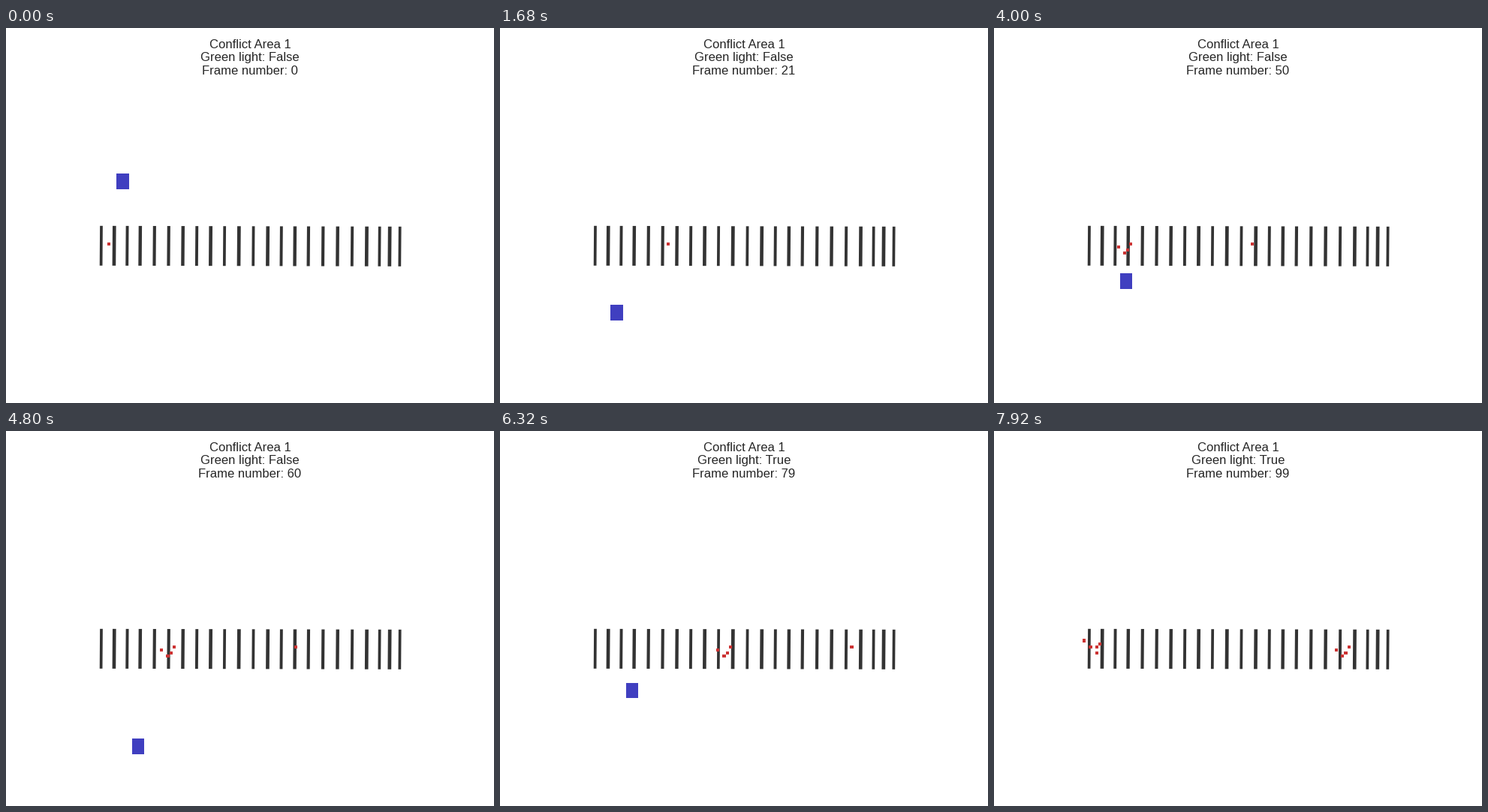
A matplotlib script that plays this animation: 650 px wide and 500 px high, repeating every 8000 ms.

```python
import matplotlib.pyplot as plt
import numpy as np
from matplotlib.animation import FuncAnimation
from matplotlib.patches import Polygon, Rectangle

WIDTH, HEIGHT, DPI = 650, 500, 100
FRAMES, INTERVAL = 100, 80
COL, ROW = 4.147, 4.152            # grid pitch in pixels
LEFT, TOP = 134.68, 285.8          # corner of grid cell (0, 0)
GREEN_FROM = 78
LAST_COL = 94
CAR_START_ROW, CAR_STEPS = -22, 32
CAR_COLS = {0: 3, 34: 8, 62: 8}    # arrival -> lane column

plt.rcParams["font.family"] = "Liberation Sans"
fig = plt.figure(figsize=(WIDTH / DPI, HEIGHT / DPI), dpi=DPI, facecolor="white")
ax = fig.add_axes([0, 0, 1, 1])
ax.set(xlim=(0, WIDTH), ylim=(HEIGHT, 0))
ax.axis("off")


def draw_crossing():
    """Stripes are nearly even, closing up at the right, with uneven widths."""
    index = np.arange(23)
    centers = np.interp(index, [0, 3, 6, 9, 12, 15, 19, 20, 22],
                        [126.8, 178.7, 235.6, 291, 348.6, 402.8, 480.4, 497.5, 524.5])
    half_widths = 2.1 + 0.25 * np.cos(2 * np.pi * (index - 10) / 2.2)
    for x, half in zip(centers, half_widths):
        top = 263.8 + (x - 127) / 400
        bottom = top + 53
        ax.add_patch(Polygon([(x - half + 0.2, top), (x + half + 0.2, top),
                              (x + half - 0.2, bottom), (x - half - 0.2, bottom)],
                             facecolor="#333333", linewidth=0))


def add_box(cols, rows, color, zorder):
    return ax.add_patch(Rectangle((0, 0), cols * COL, rows * ROW, facecolor=color,
                                  linewidth=0, zorder=zorder))


def place(box, col, row, visible):
    box.set_xy((LEFT + col * COL, TOP + row * ROW))
    box.set_visible(visible)


def pack(arrival, size, col, row):
    """Walkers side by side, each further above the one before."""
    return [(arrival, col + k, row - k * (k + 1) // 2) for k in range(size)]


def columns_walked(frame):
    """Walkers go at double pace once the light is green."""
    return frame + max(0, frame - GREEN_FROM)


walkers = (pack(0, 1, 0, 0)
           + pack(40, 3, -1, 3) + pack(40, 1, -3, 1)
           + pack(80, 2, 0, 0) + pack(80, 1, -2, 0)
           + pack(90, 1, 0, 2) + pack(90, 1, -4, -2))

draw_crossing()
walker_boxes = [add_box(1, 1, "#cc3333", 3) for _ in walkers]
car_boxes = [add_box(4, 5, "#403fc0", 4) for _ in CAR_COLS]
title = ax.text(WIDTH / 2, 61.7, "", ha="center", va="baseline", fontsize=12,
                color="#262626")


def update(frame):
    for box, (arrival, col) in zip(car_boxes, CAR_COLS.items()):
        age = frame - arrival
        place(box, col, CAR_START_ROW + 2 * age, 0 <= age <= CAR_STEPS)

    for box, (arrival, col, row) in zip(walker_boxes, walkers):
        if arrival < GREEN_FROM:   # later arrivals wait at the kerb
            col += columns_walked(frame) - columns_walked(arrival)
        place(box, col, row, frame >= arrival and col <= LAST_COL)

    title.set_text(f"Conflict Area 1\nGreen light: {frame >= GREEN_FROM}\n"
                   f"Frame number: {frame}")
    return [*car_boxes, *walker_boxes, title]


anim = FuncAnimation(fig, update, frames=FRAMES, interval=INTERVAL,
                     repeat=True, repeat_delay=0)
plt.show()
```
